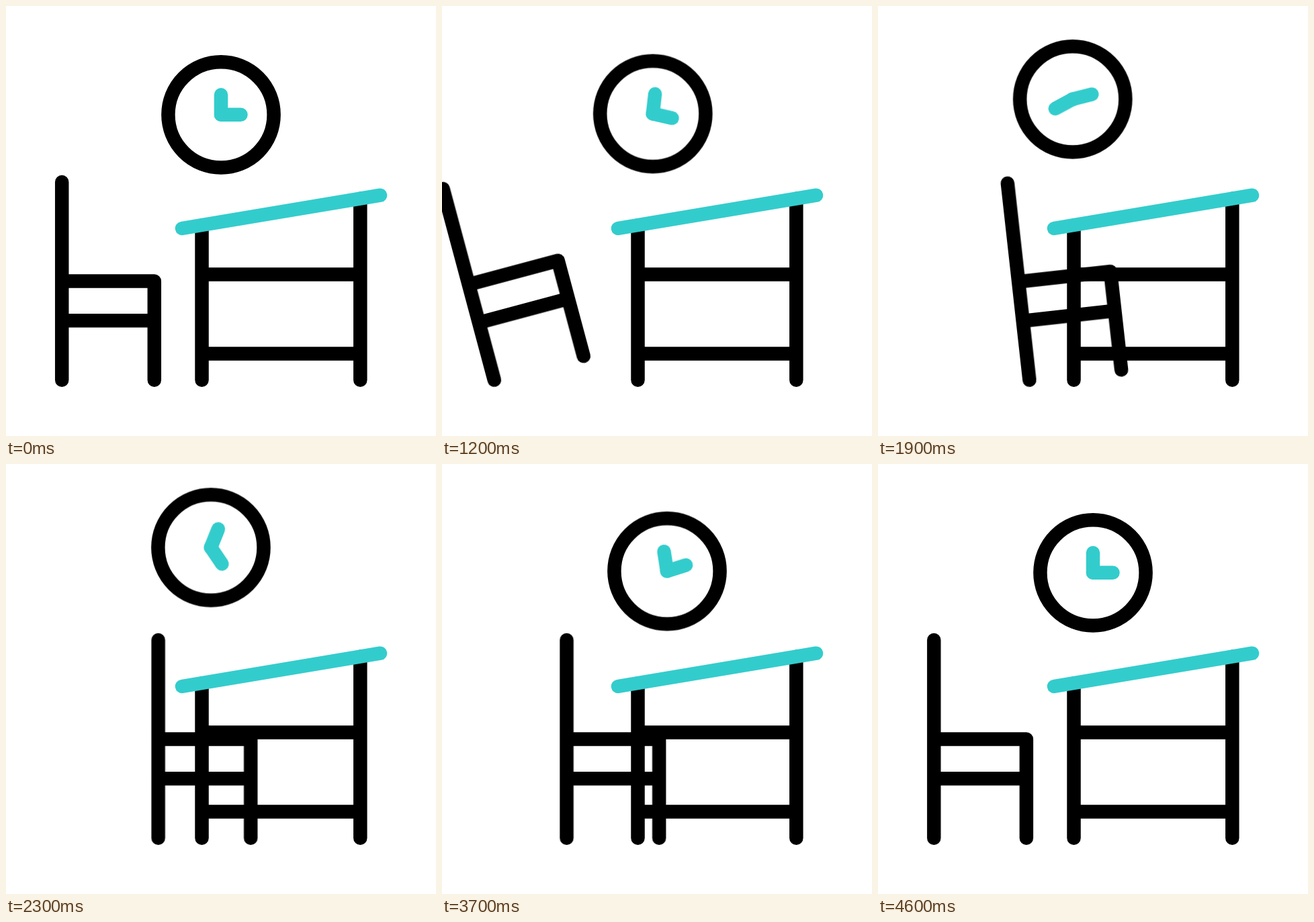
Write an HTML page without scripts that moves like this. It is 640 by 640 pixels and loops after 4.7 s.

```html
<!DOCTYPE html>
<html lang="en">
<head>
<meta charset="utf-8">
<title>Classroom desk</title>
<style>
  html, body { margin: 0; width: 100%; height: 100%; overflow: hidden; background: #fff; }
  svg { display: block; width: 100vw; height: 100vh; }
  path, circle { fill: none; stroke: #000; stroke-width: 20.5; stroke-linecap: round; stroke-linejoin: round; }
  .teal { stroke: #33cccc; }

  .slide, .tilt, .sway, .lift {
    animation: 4.7s cubic-bezier(.36, 0, .64, 1) infinite;
  }
  .slide { animation-name: slide; }
  .tilt { animation-name: tilt; transform-origin: 83.2px 556.7px; }
  .sway { animation-name: sway; }
  .lift { animation-name: lift; }
  .hand { animation: turn 4.7s ease-in-out infinite; transform-origin: 320px 161.8px; }
  .minute { --turn: 360deg; }
  .hour { --turn: 720deg; }

  /* chair: back up, rush under the desk, return */
  @keyframes slide {
    0%, 7.45% { transform: translateX(0); }
    22.34% { transform: translateX(-16.4px); }
    41.49%, 67.94% { transform: translateX(143.4px); }
    98.06%, 100% { transform: translateX(0); }
  }
  @keyframes tilt {
    0%, 14.89% { transform: rotate(0deg); }
    25.53%, 31.91% { transform: rotate(-15deg); }
    47.45%, 100% { transform: rotate(0deg); }
  }

  /* clock: one round trip, hands winding */
  @keyframes sway {
    0%, 20.21% { transform: translateX(0); }
    38.3% { transform: translateX(-31px); }
    70.21% { transform: translateX(32px); }
    86.6%, 100% { transform: translateX(0); }
  }
  @keyframes lift {
    0%, 21.28% { transform: translateY(0); }
    58.94% { transform: translateY(-45px); }
    82.13%, 100% { transform: translateY(0); }
  }
  @keyframes turn {
    0%, 19.15% { transform: rotate(0deg); }
    86.17%, 100% { transform: rotate(var(--turn)); }
  }
</style>
</head>
<body>
<svg viewBox="0 0 640 640">
  <g class="slide">
    <g class="tilt">
      <path d="M83.2 262V556.7M83.2 409.4H220.8V556.7M83.2 468.2H220.8"/>
    </g>
  </g>

  <path d="M291.5 326.6V556.7M527.3 286.7V556.7M291.5 399.5H527.3M291.5 517.4H527.3"/>
  <path class="teal" d="M262 331L557 281.7"/>

  <g class="sway">
    <g class="lift">
      <circle cx="320" cy="161.8" r="78.6"/>
      <path class="teal hand minute" d="M320 161.8V132.3"/>
      <path class="teal hand hour" d="M320 161.8H349.5"/>
    </g>
  </g>
</svg>
</body>
</html>
```
